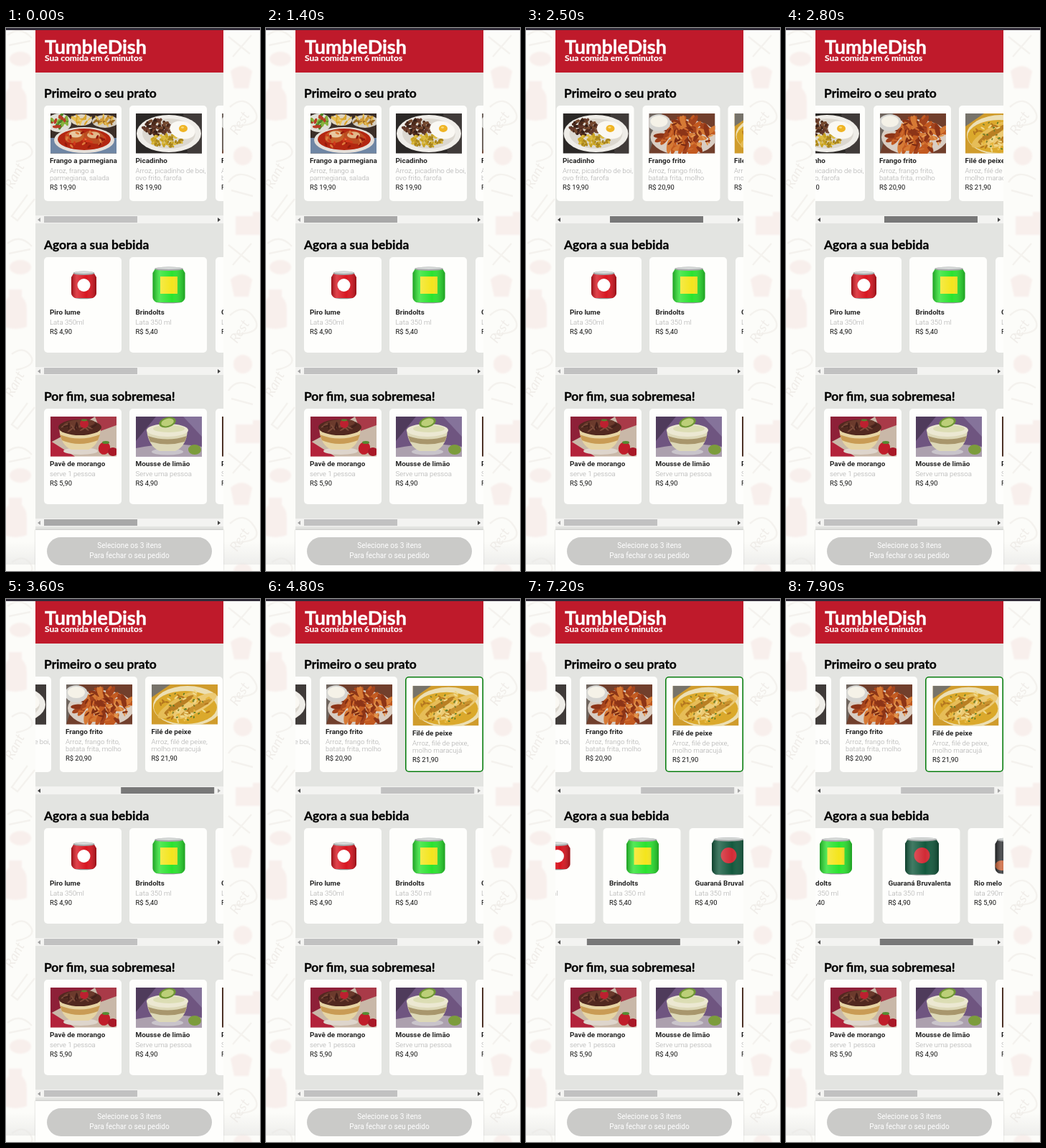
An HTML page that plays this animation: 354x756 px, repeating every 8 s.

```html
<!DOCTYPE html>
<html lang="pt-BR">
<head>
<meta charset="utf-8">
<title>TumbleDish</title>
<style>
@property --shift { syntax: '<length>'; inherits: true; initial-value: 0px; }
@property --thumb { syntax: '<color>'; inherits: true; initial-value: #c1c1c1; }
@property --prev { syntax: '<color>'; inherits: true; initial-value: #a3a3a3; }
@property --next { syntax: '<color>'; inherits: true; initial-value: #444; }

html, body { margin: 0; width: 100%; height: 100%; overflow: hidden; }
body { position: relative; background: #fcfcf9; font-family: Roboto, Arial, sans-serif; }
body > *, section > * { position: absolute; }
h1, h2, p { margin: 0; white-space: pre; }

.backdrop { left: 0; top: 0; }
.topbar { left: 0; top: 0; width: 100%; height: 3px; background: #302b38; }
header { left: 41px; top: 3px; width: 262px; height: 59px; background: #bf1a2b; color: #fff; }
header * { position: absolute; left: 13px; font-family: Lato, sans-serif; font-weight: 700; }
h1 { top: 7.6px; font-size: 27px; line-height: 30px; -webkit-text-stroke: .4px; }
header p { top: 32.4px; font-size: 12px; line-height: 14px; -webkit-text-stroke: .2px; }

main { left: 41px; top: 62px; width: 262px; height: 637px; background: #e3e4e1; }
section { position: absolute; left: 0; width: 262px; height: 211px; overflow: hidden; }
h2 { left: 12px; top: 18.6px; font: 700 17.4px/20px Lato, sans-serif; color: #000; -webkit-text-stroke: .3px; }
.row { left: 11.5px; top: 46px; display: flex; gap: 11.5px; transform: translateX(calc(var(--shift) * -1)); }
.card { flex: none; width: 108px; height: 133px; border-radius: 5px; background: #fefefc; overflow: hidden; }
.inner { position: relative; padding: 71px 0 0 8.5px; }
.inner svg { position: absolute; left: 9px; top: 11px; }
.name { font-weight: 700; font-size: 9.9px; line-height: 12px; color: #262626; }
.desc { margin: 3px 0 2.4px; font-weight: 300; font-size: 9.7px; line-height: 9.8px; color: #a9a9a9; }
.price { font-size: 9.4px; line-height: 12px; color: #111; }

.bar { left: 0; top: 199px; width: 262px; height: 11px; background: #f3f3f1; }
.bar * { position: absolute; }
.thumb { left: 12px; top: 1px; width: 130px; height: 9px; background: var(--thumb); transform: translateX(calc(var(--shift) * .494)); }
.arrow { top: 2.5px; border: solid transparent; border-width: 3px 4px; }
.prev { left: -1px; border-right-color: var(--prev); }
.next { right: 0; border-left-color: var(--next); }

footer { left: 41px; top: 699px; width: 262px; height: 57px; background: #fefefc; box-shadow: 0 -1px 2px #c9c9c7; }
.order { position: absolute; left: 16px; top: 10px; width: 230px; height: 39px; border-radius: 20px; background: #cacac8;
  color: #fff; font-size: 10.1px; line-height: 14.4px; text-align: center; padding-top: 5px; box-sizing: border-box; }

#plates { animation: plates-scroll 8s infinite, plates-bar 8s step-end infinite; }
#drinks { animation: drinks-scroll 8s infinite, drinks-bar 8s step-end infinite; }
#sweets { animation: sweets-bar 8s step-end infinite; }
#plates .card:last-child { animation: pick 8s step-end infinite; }
#plates .card:last-child .inner { animation: nudge 8s step-end infinite; }

@keyframes plates-scroll {
  0%, 20% { --shift: 0px; animation-timing-function: steps(5); }
  26.25% { --shift: 75.5px; animation-timing-function: steps(7); }
  35% { --shift: 170px; animation-timing-function: steps(6); }
  42.5%, 100% { --shift: 217px; }
}
@keyframes plates-bar {
  0% { --thumb: #c1c1c1; --prev: #a3a3a3; --next: #444; }
  17.5% { --thumb: #a8a8a8; --prev: #a3a3a3; --next: #444; }
  20% { --thumb: #787878; --prev: #a3a3a3; --next: #444; }
  21.25% { --thumb: #787878; --prev: #444; --next: #444; }
  42.5% { --thumb: #787878; --prev: #444; --next: #a3a3a3; }
  47.5% { --thumb: #a8a8a8; --prev: #444; --next: #a3a3a3; }
  50%, 100% { --thumb: #c1c1c1; --prev: #444; --next: #a3a3a3; }
}
@keyframes drinks-scroll {
  0%, 83.75% { --shift: 0px; animation-timing-function: steps(5); }
  90% { --shift: 64.5px; animation-timing-function: steps(7); }
  98.75%, 100% { --shift: 157.5px; }
}
@keyframes drinks-bar {
  0% { --thumb: #c1c1c1; --prev: #a3a3a3; }
  80% { --thumb: #a8a8a8; --prev: #a3a3a3; }
  85%, 100% { --thumb: #787878; --prev: #444; }
}
@keyframes sweets-bar {
  0% { --thumb: #a8a8a8; }
  1.25%, 100% { --thumb: #c1c1c1; }
}
@keyframes pick {
  0% { width: 108px; box-shadow: none; }
  55%, 100% { width: 109px; box-shadow: inset 0 0 0 1.6px #0a7d10; }
}
@keyframes nudge {
  0% { transform: none; }
  55%, 100% { transform: translate(1.5px, 1.8px); }
}
</style>
</head>
<body>
<svg class="backdrop" width="354" height="756">
  <defs>
    <linearGradient id="shine">
      <stop offset="0" stop-color="#000" stop-opacity=".3"/>
      <stop offset=".22" stop-color="#fff" stop-opacity=".2"/>
      <stop offset=".6" stop-color="#fff" stop-opacity="0"/>
      <stop offset="1" stop-color="#000" stop-opacity=".3"/>
    </linearGradient>
    <linearGradient id="dusk" x2="0" y2="1">
      <stop offset="0" stop-color="#e8e8e6" stop-opacity="0"/>
      <stop offset="1" stop-color="#e8e8e6"/>
    </linearGradient>
    <filter id="soft"><feGaussianBlur stdDeviation="1.2"/></filter>
    <pattern id="doodles" width="354" height="290" patternUnits="userSpaceOnUse">
      <g fill="#f8efec" filter="url(#soft)">
        <path d="M4 74h18v10q7 6 7 18v24q-16 6-32 0v-24q0-12 7-18z"/>
        <ellipse cx="20" cy="43" rx="15" ry="10"/>
        <path d="M320 262h24v-6h10v32h-34z M313 60q16-14 30 0l-5 24h-20z"/>
        <circle cx="330" cy="178" r="13"/>
      </g>
      <g fill="none" stroke="#f4f2ee" stroke-width="2.4">
        <path d="M2 10q18-14 34 4M4 24l30-6M8 164q16-12 26 2t-20 20M30 232l-22 30 8 6 24-30M310 12l30 24M342 10l-26 30M312 110q20-18 34 4t-28 22M310 215q12-20 38-4M314 226l30 8"/>
      </g>
      <g font-family="Lato, sans-serif" font-size="19" font-style="italic" fill="#f0ede9">
        <text transform="translate(9 225) rotate(-62)">Rant</text>
        <text transform="translate(322 150) rotate(-58)">Rest</text>
      </g>
    </pattern>
  </defs>
  <rect width="354" height="756" fill="url(#doodles)"/>
  <rect y="715" width="354" height="32" fill="url(#dusk)" opacity=".7"/>
</svg>
<div class="topbar"></div>
<header><h1>TumbleDish</h1><p>Sua comida em 6 minutos</p></header>
<main></main>
<footer><div class="order">Selecione os 3 itens<br>Para fechar o seu pedido</div></footer>

<script>
let seed = 11;
const rnd = () => (seed = seed * 16807 % 2147483647) / 2147483647;

const oval = (cx, cy, rx, ry, fill, turn = 0) =>
  `<ellipse cx="${cx}" cy="${cy}" rx="${rx}" ry="${ry}" fill="${fill}" transform="rotate(${turn} ${cx} ${cy})"/>`;
const shape = (d, fill) => `<path d="${d}" fill="${fill}"/>`;
const ground = fill => `<rect width="92" height="55.5" fill="${fill}"/>`;

// Random crumbs spread over an elliptical area
function scatter(n, cx, cy, rx, ry, long, thin, colors) {
  let out = '';
  for (let i = 0; i < n; i++) {
    const a = rnd() * 6.283, r = Math.sqrt(rnd());
    const x = (cx + rx * r * Math.cos(a)).toFixed(1), y = (cy + ry * r * Math.sin(a)).toFixed(1);
    out += oval(x, y, long, thin, colors[i % colors.length], Math.round(rnd() * 180));
  }
  return out;
}

// Barrel with a silver rim above and a narrower foot below
function can(x, y, w, h, body, mark) {
  const r = x + w, b = y + h;
  const side = `M${x + 3} ${y + 4}H${r - 3}L${r} ${y + 9}V${b - 8}Q${r} ${b - 4} ${r - 5} ${b - 1}H${x + 5}Q${x} ${b - 4} ${x} ${b - 8}V${y + 9}Z`;
  return oval(x + w / 2, b - 1.5, w / 2 - 5, 1.8, '#8f9393') + shape(side, body) + mark + shape(side, 'url(#shine)') +
    oval(x + w / 2, y + 3.2, w / 2 - 2.5, 2.8, '#a4a8a8') + oval(x + w / 2, y + 2.4, w / 2 - 4.5, 1.5, '#d6d9d8');
}

const art = {
  parmigiana: () => ground('#3b2e28') + shape('M0 34H92V55.5H0Z', '#6f86a4') +
    oval(12, 13, 17, 13, '#e0dfd6') + scatter(26, 11, 11, 13, 9, 4, 2, ['#4c8428', '#86b23a', '#b83c24']) +
    oval(43, 9, 15, 8, '#ddd4c2') + scatter(22, 43, 8, 12, 6, 4, 1.2, ['#d9a52f', '#e9c258']) +
    oval(76, 11, 18, 9, '#d4cdc0') + scatter(24, 76, 10, 14, 6, 4, 1.4, ['#cc942f', '#e3bd57', '#9a6822']) +
    oval(47, 37, 42, 18, '#e5e0da') + oval(47, 36, 37, 15, '#b32711') +
    oval(34, 32, 14, 9, '#c4622a', -12) + oval(61, 33, 15, 9, '#bb4c21', 12) +
    oval(35, 29, 9, 4.5, '#e8c9a2') + oval(60, 30, 9, 4.5, '#e2b98a') +
    scatter(26, 47, 37, 32, 11, 3, 1.5, ['#d23b1c', '#941a0b', '#dd7a3c']),
  picadinho: () => ground('#2b2826') + shape('M66 0H92V55.5H72Z', '#403b39') +
    oval(46, 28, 45, 26, '#efede8') + oval(46, 28, 37, 21, '#dcd8d0') +
    scatter(70, 30, 20, 20, 11, 3.2, 2, ['#4b291b', '#62382a', '#382018', '#75492f']) +
    scatter(80, 43, 38, 22, 9, 2.5, 1.5, ['#c6a123', '#dcbb40', '#a9851d']) +
    oval(65, 23, 18, 12, '#faf8f3', 14) + oval(66, 21, 6, 5, '#efb424') + oval(65, 19.5, 2, 1.2, '#f8da80'),
  chicken: () => ground('#713f2c') + shape('M0 55.5V0H18Z', '#70665f') + oval(48, 33, 46, 25, '#d9cdc2') +
    scatter(60, 52, 30, 36, 22, 10, 3.4, ['#c35a20', '#a4431c', '#d67a35', '#8c3417']) +
    scatter(40, 52, 30, 36, 20, 4, 1.2, ['#e3974e', '#cf6b2e', '#7d2c13']) +
    oval(14, 13, 16, 12, '#d5d5d2') + oval(14, 11, 12, 8, '#f5f2e8'),
  fish: () => ground('#d09c2c') + shape('M0 0H26L0 18Z', '#77736a') + oval(50, 30, 48, 28, '#ecdfb4') +
    oval(47, 32, 44, 23, '#dba92c') + oval(36, 29, 32, 9, '#e6bd58', -32) +
    oval(60, 30, 34, 10, '#ecca74', -28) + oval(38, 28, 24, 4, '#b97f23', -32) +
    oval(62, 32, 25, 4, '#c9932f', -28) +
    scatter(50, 48, 30, 38, 22, 3.2, 1.2, ['#f0d98c', '#b5781f', '#e7b63b']) +
    scatter(24, 48, 30, 34, 20, 1.6, .9, ['#547925', '#777c2a']),
  redCan: () => can(29, 8, 35, 39, '#d8141f', oval(46.5, 28, 9, 9, '#fff')),
  limeCan: () => can(23.5, 2, 45, 51, '#2ae32f', '<rect x="34" y="16" width="24" height="24" fill="#f4e51c"/>'),
  greenCan: () => can(22.5, 1.5, 47, 53, '#12593d', oval(46, 27, 11, 11, '#d22a35')),
  darkCan: () => can(29, 2, 36, 51, '#282a2c', oval(38, 41, 9, 7, '#c85f34') + oval(52, 42, 9, 7, '#6d9837')),
  pave: () => ground('#c9b8a8') + shape('M0 0H62L30 20L0 36Z', '#8e2038') + shape('M62 0H92V12L70 20Z', '#a93a48') +
    shape('M0 34L34 55.5H0Z', '#b3233b') + oval(42, 48, 24, 5, '#ded5cc') +
    shape('M12 16H70Q68 40 53 46H29Q14 40 12 16Z', '#e6d4a4') +
    shape('M13 25Q40 36 69 25L66 33Q40 43 16 33Z', '#c99c55') +
    oval(41, 15, 30, 11, '#51281f') + oval(40, 10, 22, 6, '#6b3a2c', -5) +
    scatter(14, 40, 13, 22, 7, 5, 1.2, ['#7b4a39', '#42201a']) +
    oval(47, 10, 6, 6, '#bd2030') + oval(47, 5, 4, 1.4, '#55832e') +
    oval(75, 44, 8, 9, '#c01d2b', 25) + oval(77, 36, 5, 2, '#568b32') + oval(87, 49, 7, 6, '#a91827'),
  mousse: () => ground('#6f5580') + shape('M0 0H28L0 34Z', '#4f3b5b') + shape('M66 0H92V28Z', '#85739a') +
    shape('M0 44Q46 34 92 42V55.5H0Z', '#aca0ae') + oval(44, 49, 22, 4.5, '#c9c4cb') +
    shape('M15 18H72Q71 41 55 48H33Q17 41 15 18Z', '#ddd8b8') +
    shape('M17 27Q44 36 71 27L68 35Q44 42 20 35Z', '#a8966c') +
    oval(44, 19, 29, 9, '#ece8d2') + oval(46, 17, 22, 5, '#dcddb4') +
    oval(44, 8, 12, 7, '#6f9834', -15) + oval(44, 8, 9, 5, '#bccf78', -15) + oval(82, 46, 9, 7, '#7c9c3c'),
  pudding: () => ground('#4c3226') + oval(46, 32, 36, 18, '#d49b3e')
};

const menu = [
  ['plates', 'Primeiro o seu prato', [
    ['parmigiana', 'Frango a parmegiana', 'Arroz, frango a\nparmegiana, salada', '19,90'],
    ['picadinho', 'Picadinho', 'Arroz, picadinho de boi,\novo frito, farofa', '19,90'],
    ['chicken', 'Frango frito', 'Arroz, frango frito,\nbatata frita, molho', '20,90'],
    ['fish', 'Filé de peixe', 'Arroz, filé de peixe,\nmolho maracujá', '21,90']]],
  ['drinks', 'Agora a sua bebida', [
    ['redCan', 'Piro lume', 'Lata 350ml', '4,90'],
    ['limeCan', 'Brindolts', 'Lata 350 ml', '5,40'],
    ['greenCan', 'Guaraná Bruvalenta', 'Lata 350 ml', '4,90'],
    ['darkCan', 'Rio melo Pêssego', 'lata 290ml', '5,90']]],
  ['sweets', 'Por fim, sua sobremesa!', [
    ['pave', 'Pavê de morango', 'serve 1 pessoa', '5,90'],
    ['mousse', 'Mousse de limão', 'Serve uma pessoa', '4,90'],
    ['pudding', 'Pudim', 'Serve uma pessoa', '5,90']]]
];

const card = ([pic, name, desc, price]) => `<div class="card"><div class="inner">
  <svg width="92" height="55.5">${art[pic]()}</svg>
  <p class="name">${name}</p><p class="desc">${desc}</p><p class="price">R$ ${price}</p></div></div>`;

document.querySelector('main').innerHTML = menu.map(([id, title, items], i) =>
  `<section id="${id}" style="top:${i * 211}px"><h2>${title}</h2>
  <div class="row">${items.map(card).join('')}</div>
  <div class="bar"><i class="arrow prev"></i><i class="thumb"></i><i class="arrow next"></i></div></section>`).join('');
</script>
</body>
</html>
```
